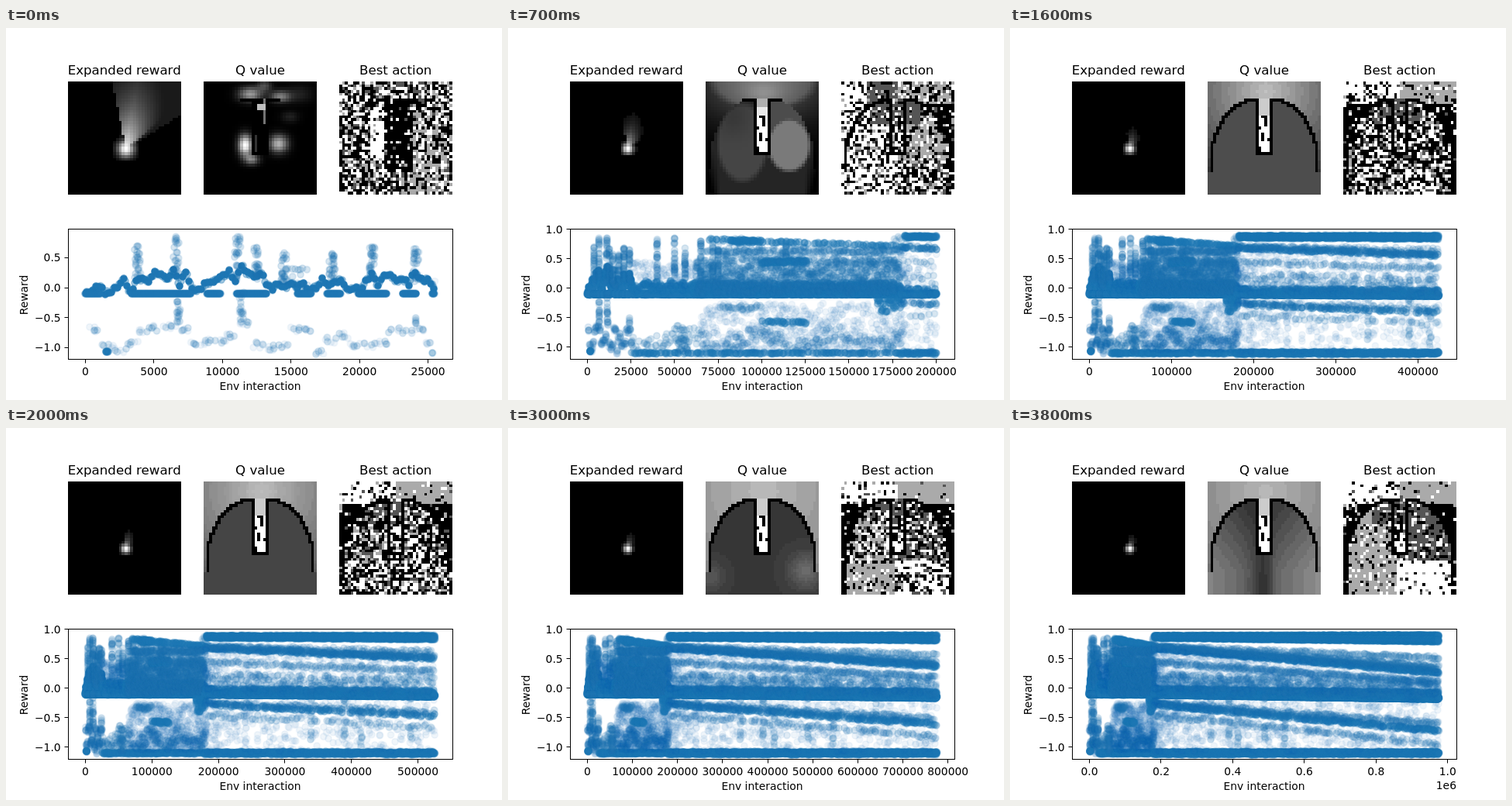
An HTML page with a canvas that plays this animation: 640 px wide and 480 px high, repeating every 3900 ms.

```html
<!DOCTYPE html>
<html lang="en">
<head>
<meta charset="utf-8">
<title>Learning progress</title>
<style>
  html, body { margin: 0; width: 640px; height: 480px; overflow: hidden; background: #fff; }
  canvas, svg { position: absolute; left: 0; top: 0; display: block; }
  text { font-family: "DejaVu Sans", sans-serif; font-size: 13.89px; fill: #000; }
  .title { font-size: 16.67px; }
  .mid { text-anchor: middle; }
  .end { text-anchor: end; }
  path, rect { fill: none; stroke: #000; stroke-width: 1; }
</style>
</head>
<body>
<canvas id="plot" width="640" height="480"></canvas>
<svg width="640" height="480" viewBox="0 0 640 480">
  <text class="title mid" x="152.7" y="60">Expanded reward</text>
  <text class="title mid" x="328" y="60">Q value</text>
  <text class="title mid" x="502.7" y="60">Best action</text>
  <rect x="80.5" y="259.5" width="496" height="168"/>
  <text class="mid" x="328" y="467">Env interaction</text>
  <text class="mid" transform="translate(28 344.5) rotate(-90)">Reward</text>
  <g id="ticks"></g>
</svg>
<script>
const FRAMES = 39, STEP = 100, GRID = 40, CELL = 3.65;
const ctx = document.getElementById('plot').getContext('2d');
const ticks = document.getElementById('ticks');

const clamp = (v, lo = 0, hi = 1) => Math.min(hi, Math.max(lo, v));
const lerp = (a, b, f) => a + (b - a) * f;
const sq = v => v * v;

// Progress keys shared by the three maps
const KEYS = [0, 4, 11, 16, 24, 30, 38];
function segment(k) {
  let i = 0;
  while (i < KEYS.length - 2 && k > KEYS[i + 1]) i++;
  return [i, clamp((k - KEYS[i]) / (KEYS[i + 1] - KEYS[i]))];
}
function keyed(k, vals) {
  const [i, f] = segment(k);
  return lerp(vals[i], vals[i + 1], f);
}

function rng(seed) {
  return () => {
    seed = (seed + 0x6D2B79F5) | 0;
    let t = Math.imul(seed ^ (seed >>> 15), 1 | seed);
    t = (t + Math.imul(t ^ (t >>> 7), 61 | t)) ^ t;
    return ((t ^ (t >>> 14)) >>> 0) / 4294967296;
  };
}
function hash(x, y, z) {
  let h = Math.imul(x + 11, 374761393) ^ Math.imul(y + 7, 668265263) ^ Math.imul(z + 3, 1442695041);
  h = Math.imul(h ^ (h >>> 13), 1274126177);
  h = Math.imul(h ^ (h >>> 16), 2246822519);
  return ((h ^ (h >>> 15)) >>> 0) / 4294967296;
}

/* ---------- maze ---------- */
const ARCH = [13, 11, 9, 8, 7, 6, 5, 5, 4, 4, 3, 3, 2, 2, 2];
const archCol = y => y - 6 < ARCH.length ? ARCH[y - 6] : 1;
const mirror = x => x < 20 ? x : 39 - x;
const inBox = (x, y) => x > 17 && x < 22 && y > 5 && y < 25;

function isWall(x, y) {
  const m = mirror(x);
  if (y >= 6 && y <= 25 && m === 17) return true;
  if (y === 25 && m > 17) return true;
  if (y < 6 || y > 31) return false;
  const from = archCol(y), to = y === 6 ? 17 : Math.max(from, archCol(y - 1));
  return m >= from && m <= to;
}
const isBaffle = (x, y) =>
  (y === 12 && x > 18 && x < 21) || (x === 20 && y > 11 && y < 16) ||
  (y === 16 && x === 18) || (x === 19 && y > 17 && y < 21) || (x === 21 && y === 20) ||
  (x === 18 && y > 22);
const inside = (x, y) => y > 6 && mirror(x) > archCol(y);

/* ---------- maps ---------- */
const blob = (x, y, cx, cy, rx, ry) => Math.exp(-sq((x - cx) / rx) - sq((y - cy) / ry));
const disk = (x, y, cx, cy, rx, ry) => clamp((1 - Math.hypot((x - cx) / rx, (y - cy) / ry)) * 6);
const quant = (v, s) => Math.round(v / s) * s;

function reward(k, x, y) {
  const dx = x - 20, dy = y - 23.3, d = Math.hypot(dx, dy);
  const size = keyed(k, [15, 5.4, 3.6, 2.8, 2.3, 2.1, 1.9]);
  const wide = keyed(k, [1, .15, .05, 0, 0, 0, 0]);
  const glow = Math.exp(-sq(d / keyed(k, [2.9, 2, 1.8, 1.7, 1.6, 1.5, 1.4])));
  const angle = Math.atan2(dx, -dy);
  if (x < 18 - 2 * wide || y > 25 + 2 * wide) return 0;
  let plume = 0;
  if (angle > -.2 && angle < 1.02) {
    const reach = size * (1 - .55 * clamp(Math.abs(angle - .17) / .75));
    plume = Math.exp(-d / reach) * clamp((1.02 - angle) * 6);
    if (angle > .2) plume = Math.max(plume, .1 * wide);
  }
  const v = Math.max(glow, plume);
  return v < .06 ? 0 : clamp(v);
}

function qOpen(i, x, y) {
  const room = inside(x, y), d = Math.hypot(x - 20, y - 3);
  const a = Math.abs(x - 19.5) / 20;
  switch (i) {
    case 0:
      return blob(x, y, 14.3, 22, 2.4, 3.5) + .7 * blob(x, y, 26, 21.5, 3.2, 3) +
        .5 * blob(x, y, 16.5, 27, 2.6, 1.8) + .6 * blob(x, y, 16, 4, 4, 2.5) +
        .48 * blob(x, y, 26.5, 4.8, 3.5, 2) + .13 * blob(x, y, 33, 4, 5, 3) +
        .3 * blob(x, y, 21, 1, 2.5, 2) + .13 * blob(x, y, 30, 12, 3, 2);
    case 1:
      if (!room) return (.24 + .2 * blob(x, y, 20, 4, 6, 4)) * disk(x, y, 20, -1, 20, 11);
      return Math.max(.22 * disk(x, y, 12.5, 21, 9.5, 15), .58 * disk(x, y, 29, 22, 8, 10),
        .27 * disk(x, y, 27, 13, 8, 9));
    case 2:
      if (!room && y < 31) return .78 * blob(x, y, 20, 0, 24, 15);
      return (.34 - .12 * blob(x, y, 9, 12, 6, 7)) *
        clamp(1.2 - Math.max(0, y - 20) * Math.max(0, a - .72) * .4);
    case 3:
      if (room || y > 31) return .3;
      return quant(.75 - .016 * d, .04);
    case 4:
      if (room || y > 31) return .24;
      return quant(.73 - .006 * d, .04);
    case 5:
      if (!room && y <= 31) return quant(.73 - .006 * d, .04);
      return quant(.22 + .2 * blob(x, y, 35, 31, 6, 6) + .12 * blob(x, y, 1, 33, 5, 5), .03);
    default:
      if (!room && y <= 31) return quant(.72 - .008 * d, .04);
      return quant(.15 + .2 * a + .17 * clamp((y - 9) / 22) -
        .13 * blob(x, y, 18.5, 36, 4, 13) + .04 * clamp(x - 22), .04);
  }
}
function qBox(i, x, y) {
  if (i === 0) return (y > 7 && y < 10 && x > 18) ? .75 : x === 21 && y < 15 ? .45 : x === 18 && y > 18 ? .2 : 0;
  if (isBaffle(x, y)) return 0;
  return y < 12 && i > 1 ? .8 : i === 1 && y < 9 ? .6 : 1;
}
function qValue(k, x, y) {
  if (isWall(x, y) && (k > 7 || mirror(x) > 16 || y < 7)) return 0;
  const [i, f] = segment(k), pick = inBox(x, y) ? qBox : qOpen;
  return clamp(lerp(pick(i, x, y), pick(i + 1, x, y), f));
}

// Preferred action (0..3) and how settled it is, per region
function policy(k, x, y) {
  const s = (...v) => keyed(k, v);
  if (inBox(x, y)) return k < 3 ? [0, .7] : isBaffle(x, y) ? [0, 1] : [y < 15 ? 1 : 3, .5];
  if (!inside(x, y) && y < 8) {
    if (x < 9) return [3, s(.1, .6, .4, .6, .8, .75, .75)];
    if (x < 20) return k < 13 ? [1, s(.1, .85, .35, .2, .2, .2, .2)] : [3, s(0, 0, .3, .5, .7, .7, .7)];
    return k < 6 && x < 30 ? [1, s(.1, .8, .3, 0, 0, 0, 0)] : [2, s(.1, .3, .65, .8, .9, .9, .88)];
  }
  if (!inside(x, y)) return x < 9 && k < 8 ? [3, s(0, .6, .2, 0, 0, 0, 0)] : [0, s(.1, .35, .6, .65, .8, .8, .82)];
  if (k < 3) {
    if (x > 10 && x < 16 && y > 9 && y < 27) return [3, .75];
    if (x > 15 && x < 26 && y > 7 && y < 32) return [0, .6];
    return [2, x > 23 && y > 10 ? .35 : 0];
  }
  if (y < 15 && x > 9 && x < 28) return [1, s(0, .8, .6, .4, .2, .3, .5)];
  if (x > 18 && y > 27) return [3, s(0, 0, 0, 0, .1, .4, .78)];
  if (x < 19) return k < 10 ? [3, s(0, .45, .15, 0, 0, 0, 0)] : [2, s(0, 0, 0, 0, .1, y > 28 ? .65 : .3, .72)];
  return k < 14 ? [2, y > 13 ? s(0, .75, .2, 0, 0, 0, 0) : .1] : [1, s(0, 0, 0, 0, .1, .3, .6)];
}
function action(k, x, y) {
  if (isWall(x, y) && (k > 2 || mirror(x) === 17 || y < 9)) return 0;
  const epoch = Math.floor(k / 5 + hash(x, y, 1));
  const [best, sure] = policy(k, x, y);
  if (hash(x, y, 50 + epoch) < sure) return best / 3;
  const r = hash(x, y, 100 + epoch);
  return r < .43 ? 0 : r < .56 ? 1 / 3 : r < .69 ? 2 / 3 : 1;
}

function drawMap(left, k, value) {
  for (let y = 0; y < GRID; y++) for (let x = 0; x < GRID; x++) {
    const g = Math.round(value(k, x, y) * 255);
    const px = Math.round(left + x * CELL), py = Math.round(69 + y * CELL);
    ctx.fillStyle = `rgb(${g},${g},${g})`;
    ctx.fillRect(px, py, Math.round(left + (x + 1) * CELL) - px, Math.round(69 + (y + 1) * CELL) - py);
  }
}

/* ---------- scatter ---------- */
const ALPHA = [.07, .18, .4, 1];
const dots = ALPHA.map(a => {
  const c = document.createElement('canvas');
  c.width = c.height = 12;
  const g = c.getContext('2d');
  g.fillStyle = g.strokeStyle = `rgba(31,119,180,${a})`;
  g.lineWidth = 1.2;
  g.arc(6, 6, 4.2, 0, 7);
  g.fill();
  g.stroke();
  return c;
});

// Opening stretch, in hundredths of reward
const HIGH = [-10, -7, 5, -10, -6, 2, 18, -9, 12, 14, 12, 24, 25, 14, 28, 5, 25, 0, -6,
  4, 10, 12, 18, 26, 12, 38, 22, 18, 25, 8, -2, 8, -2, 6, 2, 4, -10, 2, 15, 3, 8, 16,
  -2, 0, -4, 10, 24, 2, 22, 20, 8, 14, 6, 28, 12, 14, 0];
const LOW = [-70, -100, -106, -92, -70, -68, -66, -70, -92, -90, -92, -80, -62, -96,
  -100, -96, -70, -72, -108, -88, -80, -95, -97, -92, -70, -72, -68, -95];
const SPIKES = [[3.8, .7], [6.6, .85], [11.1, .85], [12.5, .67], [14.5, .58], [18, .57],
  [20.9, .68], [24.1, .65], [40, .83], [50, .85], [56, .68], [65, .8], [72, .8], [75, .8], [114, .8]];
const STRIPES = [340, 390, 415, 490, 545, 640];

const points = [];
const rand = rng(41);
const add = (u, y, level) => points.push([u, y, level]);
const jit = w => (rand() - .5) * w;
const fan = u => clamp((u - 180) / 795);

function row(u0, u1, step, level, width, at, chance = 1) {
  for (let u = u0; u < u1; u += step)
    if (rand() < chance) add(u + jit(step), at(u) + jit(width), level);
}

function build() {
  const gap = .4524;
  for (let i = 0; i < HIGH.length; i++) {
    const next = HIGH[Math.min(i + 1, HIGH.length - 1)];
    for (let j = 0; j < 4; j++)
      add(.085 + (i + j / 4) * gap, lerp(HIGH[i], next, j / 4) / 100 + jit(.08), j % 2 ? 2 : 3);
  }
  for (let u = 0; u < 25.5; u += .12)
    if (hash(Math.floor(u / 1.1), 5, 2) < .6) add(u, -.1, 3);
  LOW.forEach((v, i) => {
    for (let j = 0; j < 6; j++) add(.3 + (i + rand()) * .905, v / 100 + jit(.1), j % 2);
  });
  for (let j = 0; j < 8; j++) add(1.65 + jit(.3), -1.07, 2);
  row(14.8, 16.3, .22, 1, .04, () => .31);
  row(14.8, 16.3, .2, 1, .2, () => .12);
  for (const [u, top] of SPIKES) {
    for (let j = 0; j < 26; j++) add(u + jit(.45), lerp(.1, top, rand()), 1);
    add(u, top, 1);
  }
  for (const u of [6.8, 11.4])
    for (let j = 0; j < 16; j++) add(u + jit(.3), -.6 * rand(), 1);
  for (let j = 0; j < 5; j++) add(24.1, -.55 + jit(.1), 1);

  // Exploration
  row(25.5, 180, .25, 3, .02, () => -.1);
  row(25.5, 66, .25, 2, .16, u => -.04 + .13 * Math.abs(Math.sin(u / 4.6) * Math.sin(u / 2.1 + 1)));
  row(25.5, 66, .3, 0, .5, () => .2);
  row(60, 180, .2, 2, .2, () => 0);
  row(62, 180, .11, 1, .58, () => .2);
  row(78, 101, .35, 1, .4, () => .66);
  row(82, 100, .5, 2, .05, () => .8);
  row(100, 126, .4, 2, .05, () => .45);
  row(100, 180, .35, 1, .3, () => .55, .7);
  row(70, 185, .9, 2, .04, u => .83 - (u - 70) * .0011, .7);
  row(66, 180, .5, 1, .06, () => .63, .5);
  row(25.5, 180, .35, 1, .28, u => -.88 + .12 * Math.sin(u / 7), .5);
  row(25.5, 180, .45, 2, .03, () => -1.1, .55);
  row(52, 58, .2, 1, .25, () => -.95);
  row(65, 180, .2, 0, .8, () => -.65);
  row(76, 100, .5, 1, .08, () => -.33, .7);
  row(100, 126, .5, 2, .05, () => -.58, .6);
  row(166, 181, .35, 2, .25, () => -.28);

  // Fanning bands
  row(180, 976, .35, 3, .03, u => -.1 - .07 * fan(u));
  row(180, 976, .5, 2, .12, u => -.06 - .06 * fan(u));
  row(180, 976, .7, 1, .3, u => .1 - .1 * fan(u), .55);
  row(176, 181, 1, 1, .08, () => .84);
  row(182, 976, .5, 2, .03, u => .88 + .01 * fan(u));
  row(182, 976, .5, 2, .04, u => .87 - .06 * fan(u));
  row(181, 976, 1.2, 2, .06, u => .69 - .42 * fan(u), .75);
  row(181, 976, 1.6, 1, .08, u => .7 - .34 * fan(u));
  row(181, 976, 2.2, 1, .06, u => .71 - .19 * fan(u), .6);
  row(181, 976, 2, 1, .06, u => .45 - .36 * fan(u), .75);
  row(181, 976, 1.6, 2, .06, u => -.27 - .45 * fan(u), .6);
  row(181, 976, 2, 1, .07, u => -.25 - .35 * fan(u), .7);
  row(181, 976, 3, 1, .08, u => -.45 - .5 * fan(u), .6);
  row(180, 976, .55, 2, .03, () => -1.1);
  row(180, 976, 1.1, 2, .06, () => -1.1);
  for (let j = 0; j < 1500; j++) {
    const u = 180 + 795 * Math.pow(rand(), 1.5);
    add(u, j % 2 ? -.2 - .88 * rand() : lerp(-.1, .68 - .4 * fan(u), rand()), 0);
  }
  for (const u of STRIPES)
    for (let j = 0; j < 14; j++) add(u + jit(3), lerp(-1, .55 - .4 * fan(u), rand()), 1);
}
build();

/* ---------- axes and frame ---------- */
function drawScatter(total, yOf) {
  const scale = 450.9 / total * 1000;
  ctx.save();
  ctx.beginPath();
  ctx.rect(80, 260, 496, 168);
  ctx.clip();
  for (const [u, y, level] of points)
    if (u * 1000 <= total) ctx.drawImage(dots[level], 96.5 + Math.max(0, u) * scale, yOf(y) - 6);
  ctx.restore();
}

function tickStep(span) {
  const raw = span / 9, mag = Math.pow(10, Math.floor(Math.log10(raw)));
  return mag * [1, 2, 2.5, 5, 10].find(s => s * mag >= raw);
}

function drawTicks(total, yOf, top) {
  const step = tickStep(total * 1.1), count = Math.floor(total * 1.05 / step);
  const big = count * step >= 1e6;
  let out = '';
  for (let i = 0; i <= count; i++) {
    const v = i * step, x = 102.5 + v / total * 450.9;
    const label = big ? (v / 1e6).toFixed(1) : Math.round(v);
    out += `<path d="M${Math.floor(x) + .5} 428v4.5"/><text class="mid" x="${x.toFixed(2)}" y="447.6">${label}</text>`;
  }
  for (let v = -1; v <= top; v += .5) {
    const y = yOf(v), label = (v < 0 ? '\u2212' : '') + Math.abs(v).toFixed(1);
    out += `<path d="M75.5 ${Math.floor(y) + .5}h4.5"/><text class="end" x="70.7" y="${(y + 5).toFixed(2)}">${label}</text>`;
  }
  if (big) out += '<text class="end" x="576" y="466">1e6</text>';
  ticks.innerHTML = out;
}

function draw(k) {
  const total = 25000 * (k + 1) + 500, late = k > 5;
  const yOf = late ? v => 335.8 - 76 * v : v => 335 - 77.2 * v;
  ctx.fillStyle = '#fff';
  ctx.fillRect(0, 0, 640, 480);
  drawMap(80, k, reward);
  drawMap(255, k, qValue);
  drawMap(430, k, action);
  drawScatter(total, yOf);
  drawTicks(total, yOf, late ? 1 : .5);
}

let shown = -1;
const start = performance.now();
function tick() {
  const k = Math.floor((performance.now() - start) / STEP) % FRAMES;
  if (k !== shown) draw(shown = k);
  requestAnimationFrame(tick);
}
tick();
</script>
</body>
</html>
```
